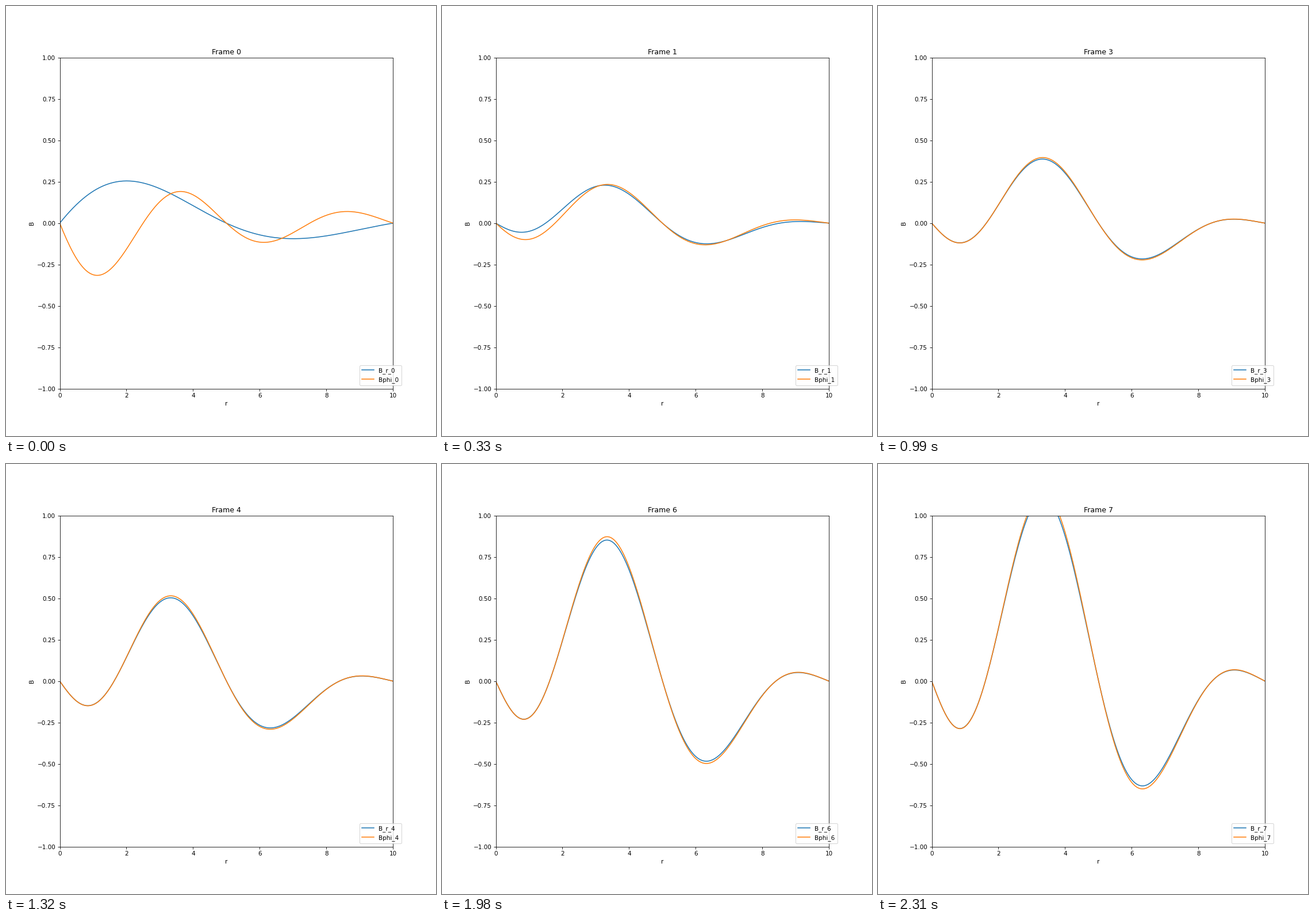
A matplotlib script that plays this animation: 748 px wide and 748 px high, repeating every 2.64 s.

```python
import numpy as np
import matplotlib.pyplot as plt
from matplotlib.animation import FuncAnimation

FRAMES, INTERVAL = 8, 330
STEPS = 100                 # integration steps per frame
DIFFUSION = 0.005
DECAY = 2.34

r = np.linspace(0, 10, 201)
dr = r[1]
envelope = 0.4 * np.exp(-r / 5)
br0 = envelope * np.sin(np.pi * r / 5)
bphi0 = -envelope * np.sin(2 * np.pi * r / 5)

# Each radius has one growing and one decaying mode, softened near the centre.
core = np.exp(-(r / 2.5) ** 2)
ratio = 0.972 + 0.028 * core        # B_r / Bphi in the growing mode
growth = 0.2745 - 0.0345 * core


def laplacian(f):
    """Cylindrical vector Laplacian, with fixed ends."""
    out = np.zeros_like(f)
    x = r[1:-1]
    out[1:-1] = ((f[2:] - 2 * f[1:-1] + f[:-2]) / dr ** 2
                 + (f[2:] - f[:-2]) / (2 * dr * x) - f[1:-1] / x ** 2)
    return out


def evolve(f, rate):
    """Mode amplitude at the start of every frame."""
    dt = 1 / STEPS
    gain = np.exp(rate * dt)
    states = [f]
    for _ in range(FRAMES - 1):
        for _ in range(STEPS):
            f = gain * (f + DIFFUSION * dt * laplacian(f))
        states.append(f)
    return np.array(states)


up = evolve((br0 + ratio * bphi0) / 2, growth)
down = evolve((br0 - ratio * bphi0) / 2, -DECAY)
fields = {"B_r": up + down, "Bphi": (up - down) / ratio}

fig, ax = plt.subplots(figsize=(10, 10), dpi=74.8)
lines = [ax.plot(r, b[0], label=f"{name}_0")[0] for name, b in fields.items()]
ax.set(xlim=(0, 10), ylim=(-1, 1), xlabel="r", ylabel="B")
title = ax.set_title("Frame 0")
legend = ax.legend(loc=(0.9, 0.01))


def update(i):
    for line, text, (name, b) in zip(lines, legend.get_texts(), fields.items()):
        line.set_ydata(b[i])
        text.set_text(f"{name}_{i}")
    title.set_text(f"Frame {i}")
    return [*lines, title, legend]


anim = FuncAnimation(fig, update, frames=FRAMES, interval=INTERVAL,
                     repeat=True, repeat_delay=0)
plt.show()
```
